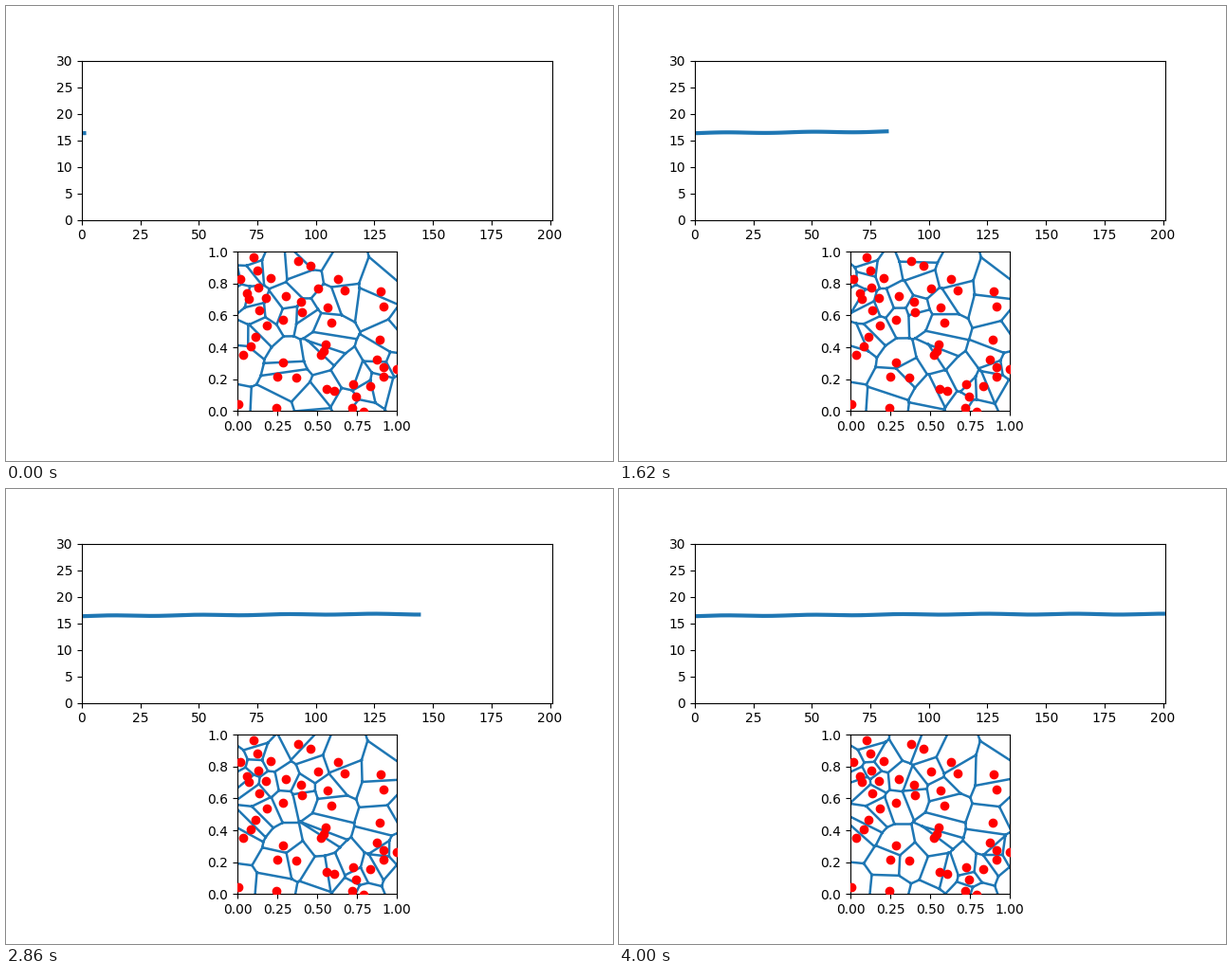
Write a matplotlib script that moves like this. It is 640x480 px and loops after 4.02 s.

```python
import numpy as np
import matplotlib.pyplot as plt
from matplotlib.animation import FuncAnimation
from matplotlib.tri import Triangulation

FRAMES = 201
INTERVAL = 20
SIDE = 168  # pixels along one edge of the square plot

# Marked points, in pixels from the lower left corner of the square.
DOTS = (np.array([
    (17, 162), (64, 158), (77, 153), (21, 148), (3, 139), (35, 140),
    (106, 139), (22, 130), (85, 129), (113, 127), (10, 124), (12, 118),
    (30, 119), (51, 121), (67, 115), (151, 126), (154, 110), (95, 109),
    (68, 104), (23, 106), (48, 96), (31, 90), (99, 93), (19, 78), (150, 75),
    (93, 70), (91, 63), (88, 59), (14, 68), (6, 59), (48, 51), (147, 54),
    (154, 46), (168, 44), (154, 36), (42, 36), (62, 35), (122, 28),
    (140, 26), (94, 23), (102, 21), (125, 15), (121, 3), (133, -1), (1, 7),
    (41, 3),
]) + (0, 0.2)) / SIDE

# Unmarked seeds that settle just outside the square.
OUTSIDE = np.array([(1.04, 0.97), (1.04, 0.52), (1.03, 0.08), (0.48, -0.04)])

# Distant points keep every visible cell bounded.
FAR = np.array([(-9, -9.2), (9, -8), (9.5, 9), (-8, 9.3)])

# Each seed drifts in a straight line and comes to rest on its point.
rng = np.random.default_rng(4)
target = np.vstack([DOTS, OUTSIDE])
drift = rng.normal(0, 0.04, target.shape)


def circumcenters(a, b, c):
    b, c = b - a, c - a
    d = 2 * (b[:, 0] * c[:, 1] - b[:, 1] * c[:, 0])
    bb, cc = (b ** 2).sum(axis=1), (c ** 2).sum(axis=1)
    x = (c[:, 1] * bb - b[:, 1] * cc) / d
    y = (b[:, 0] * cc - c[:, 0] * bb) / d
    return a + np.column_stack([x, y])


def voronoi_edges(seeds):
    """Voronoi edges as x and y arrays with NaN between the segments."""
    pts = np.vstack([seeds, FAR])
    tri = Triangulation(pts[:, 0], pts[:, 1])
    centers = circumcenters(*(pts[tri.triangles[:, k]] for k in range(3)))
    i, k = np.nonzero(tri.neighbors > np.arange(len(centers))[:, None])
    p, q = centers[i], centers[tri.neighbors[i, k]]
    path = np.stack([p, q, np.full_like(p, np.nan)], axis=1).reshape(-1, 2)
    return path[:, 0], path[:, 1]


# A slow rise that levels off, with a faint ripple.
steps = np.arange(FRAMES + 1)
length = 16.36 + 0.35 * np.minimum(steps / 110, 1)
length += 0.08 * np.cos(2 * np.pi * (steps - 50) / 37.5)

fig, (top, box) = plt.subplots(2, 1, figsize=(6.4, 4.8), dpi=100)

top.set_xlim(0, FRAMES)
top.set_ylim(0, 30)
trace, = top.plot([], [], color="C0", lw=3)

box.set_aspect("equal")
box.set_xlim(0, 1)
box.set_ylim(0, 1)
box.set_xticks(np.linspace(0, 1, 5))
box.set_yticks(np.linspace(0, 1, 6))
edges, = box.plot([], [], color="C0", lw=1.8)
box.plot(DOTS[:, 0], DOTS[:, 1], "ro", zorder=3)


def update(n):
    trace.set_data(steps[:n + 2], length[:n + 2])
    left = 1 - n / (FRAMES - 1)
    edges.set_data(*voronoi_edges(target + drift * left))
    return trace, edges


anim = FuncAnimation(fig, update, frames=FRAMES, interval=INTERVAL,
                     repeat=True, repeat_delay=0)
plt.show()
```
